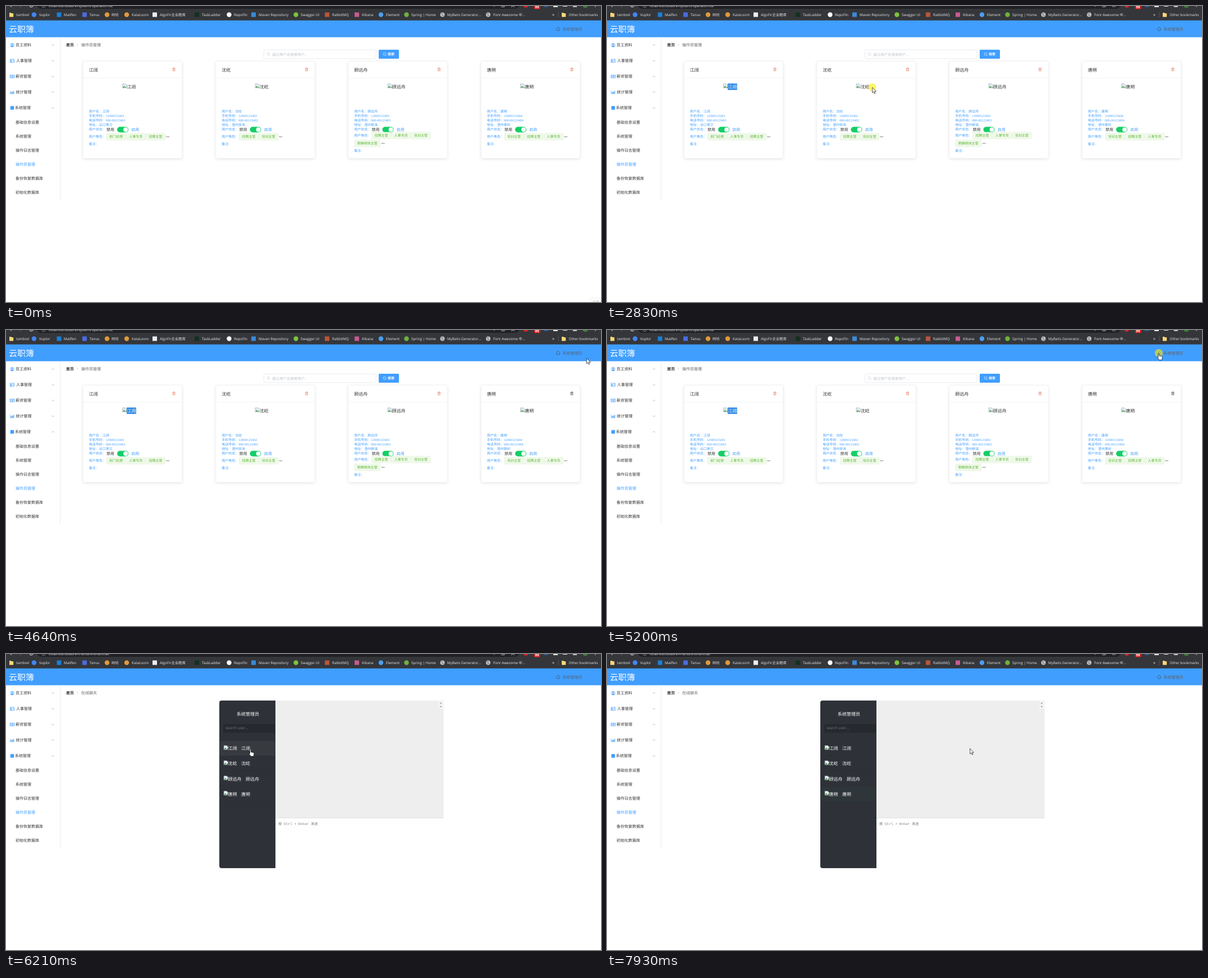
Write an HTML page that moves like this. It is 1060 px wide and 528 px high and loops after 8000 ms.

```html
<!DOCTYPE html>
<html lang="zh-CN">
<head>
<meta charset="utf-8">
<title>操作员管理</title>
<style>
html, body { margin: 0; width: 100%; height: 100%; overflow: hidden; background: #fff; }
svg { display: block; width: 1060px; height: 528px; text-rendering: geometricPrecision;
  font-family: 'Noto Sans CJK SC', 'Noto Sans CJK', sans-serif; }
.bar { font-family: 'Open Sans', 'Noto Sans CJK SC', sans-serif; }
.info { font-family: 'Liberation Serif', 'Noto Sans CJK SC', serif; }
.mono { font-family: 'Liberation Mono', 'Noto Sans CJK SC', monospace; }
.bar, .info, .medium { font-weight: 500; }
</style>
</head>
<body>
<svg id="stage" viewBox="0 0 1060 528"></svg>
<script>
const BLUE = '#409eff', INK = '#303133', GREY = '#606266', TRASH = '#e5734f';
const LOOP = 8000, CHAT_AT = 5340;

const rect = (x, y, w, h, fill, more = '') =>
  `<rect x="${x}" y="${y}" width="${w}" height="${h}" fill="${fill}" ${more}/>`;
const circle = (x, y, r, fill, more = '') =>
  `<circle cx="${x}" cy="${y}" r="${r}" fill="${fill}" ${more}/>`;
const line = (d, stroke, width = 0.6, more = '') =>
  `<path d="${d}" fill="none" stroke="${stroke}" stroke-width="${width}" ${more}/>`;
// Text is placed by its left edge and vertical centre.
const text = (x, cy, size, fill, str, more = '') =>
  `<text x="${x}" y="${(cy + size * 0.37).toFixed(2)}" font-size="${size}" fill="${fill}" ${more}>${str}</text>`;
const group = (id, body, more = '') => `<g id="${id}" ${more}>${body}</g>`;
const at = (x, y, body) => `<g transform="translate(${x} ${y})">${body}</g>`;

const people = [
  { x: 137.5, name: '江阔', phone: '12000123401', tel: '000-00123401', place: '云口青兰',
    roles: ['部门经理', '人事专员', '招聘主管'] },
  { x: 374, name: '沈屹', phone: '12000123402', tel: '000-00123402', place: '澄州安禾',
    roles: ['招聘主管', '培训主管'] },
  { x: 610, name: '顾远舟', phone: '12000123403', tel: '000-00123403', place: '澄州柳溪',
    roles: ['招聘主管', '人事专员', '培训主管'], extra: '薪酬绩效主管' },
  { x: 846.5, name: '唐朔', phone: '12000123404', tel: '000-00123404', place: '澄州景岭',
    roles: ['培训主管', '招聘主管', '人事专员'] }
];

const folder = x => `<path d="M${x} 12h3l1 1h3.2v6.5h-7.2z" fill="#f8d775"/>`;
const globe = x => circle(x, 15.5, 4, '#c4c7cb') +
  line(`M${x - 3} 13.5l3 1 1-1.5M${x - 2} 18l2-1.5 2.5 1`, '#55585c', 1);
const lens = (x, y, color) => circle(x - 0.4, y - 0.4, 2.3, 'none', `stroke="${color}" stroke-width=".6"`) +
  line(`M${x + 1.3} ${y + 1.3}l1.5 1.5`, color);

function browserBar() {
  // icon centre, shape, colour, text start, label
  const marks = [
    [50, 'o', '#4285f4', 59, 'Vuplor'], [94.5, 's', '#1a7fd4', 103, 'Mailfen'],
    [140, 's', '#4a6be0', 149, 'Tanvu'], [180, 'o', '#e09a3a', 188, '码坊'],
    [215, 'o', '#e09a3a', 224, 'KataLoom'], [265, 's', '#e9eef5', 274, 'AlgoFir企业题库'],
    [340, 's', '#12301f', 349, 'TaskLadder'], [397.5, 'o', '#ffffff', 406, 'RepoFin'],
    [441, 's', '#3b8ad8', 450, 'Maven Repository'], [516.5, 'o', '#7cc43c', 525, 'Swagger UI'],
    [572, 's', '#b9553a', 581, 'RabbitMQ'], [625, 's', '#c65a92', 634, 'Kibana'],
    [668, 'o', '#4a9ff0', 677, 'Element'], [713.5, 'o', '#6db33f', 722, 'Spring | Home'],
    [777.5, 'g', '', 786, 'MyBatis Generator...'], [859, 'g', '', 868, 'Font Awesome 中...']
  ];
  const label = (x, str) => text(x, 15.5, 6.35, '#e8eaed', str);
  const url = (id, path) => group(id, text(76, 0, 6.5, '#e8eaed', 'localhost:8080/#/' + path));
  let out = rect(0, 0, 1060, 26, '#35363a') + rect(55, -12, 860, 17, '#202124', 'rx="8"') +
    url('urlList', 'system/operator/list') + url('urlChat', 'friend/online/chat') +
    line('M7 -1l3 3', '#e8eaed', 1) + line('M25 2l3-3', '#77797d', 1) +
    circle(45, -1, 3, 'none', 'stroke="#e8eaed"') + circle(67, -0.5, 3, 'none', 'stroke="#9aa0a6" stroke-width=".8"') +
    line('M869 1l3-2M882 1.5h6v-3M900 2l3-2 3 2', '#d4d6d9', 0.8) +
    circle(926, -1, 4, '#d8232a') + rect(958, -3, 8, 4.5, '#2b6cb0') + rect(975, -3, 8, 5, '#eef0f2') +
    rect(992, -3, 8, 4, '#eef0f2') + rect(1010, -3, 7, 5, '#c4c7cb') + circle(1032, -1.5, 5, '#3f7d3a') +
    circle(1050, 1, 0.8, '#e8eaed') + rect(941, -3, 10.5, 8.5, '#e02020', 'rx="1.5"') +
    text(942.6, 2.2, 6, '#fff', '99', 'font-weight="700"') +
    folder(6) + label(18, 'tambrel');
  for (const [x, shape, color, tx, str] of marks) {
    out += shape === 'o' ? circle(x, 15.5, 4.2, color)
      : shape === 's' ? rect(x - 4, 11.5, 8, 8, color) : globe(x);
    out += label(tx, str);
  }
  return `<g class="bar">${out}${text(973, 15, 8, '#e8eaed', '»')}${line('M984 11v9', '#6a6c70', 0.6)}` +
    `${folder(990)}${label(1002.5, 'Other bookmarks')}</g>`;
}

function header() {
  return rect(0, 25.7, 1060, 30, BLUE) + text(5, 41.3, 15, '#fff', '云职簿', 'class="medium"') +
    line('M981 43.2v-2.4a2.7 2.7 0 0 1 5.4 0v2.4M980.4 43.3h6.6M983 44.4h1.4M983.7 38v-.8', '#44566d', 0.7) +
    text(991.5, 41, 7, GREY, '系统管理员');
}

function sidebar() {
  const icons = [
    circle(0, 0, 3.4, 'none', `stroke="${BLUE}" stroke-width=".7"`) + circle(0, -0.9, 1.4, BLUE) +
      `<path d="M-2.3 2.3a2.4 2 0 0 1 4.6 0L0 3.3z" fill="${BLUE}"/>`,
    rect(-3.7, -2.7, 7.4, 5.4, 'none', `stroke="${BLUE}" stroke-width=".7"`) + circle(-1.7, -0.8, 0.9, BLUE) +
      rect(-2.9, 0.3, 2.4, 1.4, BLUE) + line('M.6-1h2.3M.6.7h2.3', BLUE),
    rect(-3.7, -2.4, 7.4, 4.8, 'none', `stroke="${BLUE}" stroke-width=".9"`) + circle(0, 0, 1.3, BLUE) +
      line('M-2.7-.6v1.2M2.7-.6v1.2', BLUE),
    line('M-3.6-3v6h7.4', BLUE) + line('M-2 2.4V.3M-.4 2.4v-3.8M1.2 2.4V-.4M2.8 2.4v-4.8', BLUE, 1.1),
    rect(-3.2, -3.2, 6.4, 6.4, BLUE)
  ];
  const titles = ['员工资料', '人事管理', '薪资管理', '统计管理', '系统管理'];
  const left = [17, 18, 17, 17.5, 16];
  const items = ['基础信息设置', '系统管理', '操作日志管理', '操作员管理', '备份恢复数据库', '初始化数据库'];
  const menu = titles.map((str, i) => {
    const y = 69.7 + i * 28, flip = i === 4 ? -1 : 1;
    return at(11, y, icons[i]) + text(left[i], y, 7, INK, str) +
      line(`M81.5 ${y - flip}l2.2 ${2 * flip} 2.2 ${-2 * flip}`, '#909399', 0.6);
  }).join('');
  const sub = items.map((str, i) => text(17, 207.2 + i * 25, 7, i === 3 ? BLUE : INK, str)).join('');
  return menu + sub + rect(96.4, 55.7, 0.6, 290.3, '#dcdfe6');
}

const broken = (x, y) => at(x, y,
  '<path d="M.4.4h5l2 2v5.2h-7z" fill="#e4eefa" stroke="#8b9096" stroke-width=".6"/>' +
  '<path d="M.8 7.2L3.2 3.8 5 6l2-1v2.2z" fill="#48a04c"/>' + line('M7.8 3.4L3.4 8', '#fff', 0.9));

const crumb = str => text(134, 69, 7, GREY, str);

function tag(x, cy, str) {
  const w = str.length * 6 + 10;
  return rect(x, cy - 6, w, 12, '#f0f9eb', 'rx="1.5" stroke="#d8eecb" stroke-width=".5"') +
    text(x + 5, cy, 6, '#5fb834', str, 'class="medium"');
}

function card(p, i) {
  const x = p.x, left = x + 10.3, roleY = p.extra ? 231 : 233.2;
  const info = (cy, str) => text(left, cy, 6, BLUE, str, 'class="info"');
  let out = rect(x, 99, 176, 172.5, '#fff', 'rx="2" stroke="#ebeef5" stroke-width=".5" filter="url(#shadow)"') +
    rect(x, 128, 176, 0.5, '#e6e9f0') + text(left, 114, 8, INK, p.name) +
    at(x + 161.5, 113.2, line('M-2.6-1.8H2.6M-1-1.8v-1H1v1M-1.9-1.8v4.5h3.8v-4.5M-.6-.5v2M.6-.5v2',
      TRASH, 0.6, `id="trash${i}"`)) +
    broken(x + 69.7, 138.5) +
    (i ? '' : rect(215, 138.3, 16.8, 11.4, '#2b87e3', 'id="selection"')) +
    text(x + 77.8, 144, 8, INK, p.name, `id="alt${i}"`) +
    info(188, '用户名：' + p.name) + info(196, '手机号码：' + p.phone) +
    info(204, '电话号码：' + p.tel) + info(211.8, '地址：' + p.place) + info(219.3, '用户状态：') +
    text(x + 41.5, 220, 7, INK, '禁用', 'class="medium"') +
    rect(x + 60.5, 215.5, 20, 10, '#13ce66', 'rx="5"') + circle(x + 75.6, 220.5, 4, '#fff') +
    text(x + 85.8, 220, 7, BLUE, '启用', 'class="medium"') + info(roleY, '用户角色：');
  p.roles.forEach((r, k) => out += tag(x + 41.5 + k * 35.3, roleY, r));
  let dotX = x + 41.5 + p.roles.length * 35.3, dotY = roleY;
  if (p.extra) {
    out += tag(x + 10.8, 245, p.extra);
    [dotX, dotY] = [x + 58.5, 245];
  }
  for (let k = 0; k < 3; k++) out += circle(dotX + 1.2 + k * 2, dotY, 0.75, GREY);
  return out + info(p.extra ? 257.3 : 245.3, '备注：');
}

function listPage() {
  return crumb('操作员管理') +
    rect(459.5, 78.3, 199.5, 15.4, '#fff', 'rx="2" stroke="#dcdfe6" stroke-width=".6"') +
    lens(467.8, 86, '#c0c4cc') + text(474, 86.2, 6.5, '#c0c4cc', '通过用户名搜索用户...') +
    rect(664, 78, 36, 16, BLUE, 'rx="1.5"') + lens(674.8, 86, '#fff') +
    text(680, 86, 6, '#fff', '搜索', 'font-weight="700"') + people.map(card).join('');
}

const rowTop = i => 155 + i * 27.1;

function chatPage() {
  let out = crumb('在线聊天') +
    '<path d="M480 83h-96a4 4 0 0 0-4 4v291a4 4 0 0 0 4 4h96z" fill="#2e3238"/>' +
    text(411, 107.3, 8, '#fff', '系统管理员') + rect(387, 125, 92, 15.3, '#26292e') +
    text(391, 132, 6.5, '#75797e', 'search user...', 'class="bar"') + rect(380, 154.6, 100, 0.5, '#292c33');
  people.forEach((p, i) => {
    const cy = rowTop(i) + 13.4;
    out += rect(380, rowTop(i), 100, 26.8, '#2e3238', `id="row${i}"`) +
      rect(380, rowTop(i) + 26.6, 100, 0.5, '#292c33') + broken(387.7, cy - 5.6) +
      text(395.5, cy, 8, '#fff', p.name) + text(403 + p.name.length * 8, cy, 8, '#fff', p.name);
  });
  return out + rect(480, 83, 299.5, 209.5, '#eee') + rect(480, 292.2, 299.5, 0.6, '#d0d0d0') +
    rect(770.5, 83, 8.5, 15, '#f4f4f4') +
    '<path d="M772.6 88.6l1.9-2 1.9 2zM772.6 93l1.9 2 1.9-2z" fill="#8a8a8a"/>' +
    text(485, 302.4, 6.2, '#757575', '按 Ctrl + Enter 发送', 'class="mono"');
}

const pointer = group('arrow',
    '<path d="M.2.2v9.6l2.2-2.1 1.6 3.6 1.5-.7-1.6-3.4h3z" fill="#fff" stroke="#111" stroke-width=".7"/>') +
  group('hand', '<path d="M-1 1q1-1.4 2 0v4l1.5.2 1.6.3 1.5.5q1 .4.9 1.5l-.6 3.2-.4 1.9H.7L-2.2 8.2q-.7-1.4.5-1.3L-1 7.6z" ' +
    'fill="#fff" stroke="#111" stroke-width=".8"/>');

document.getElementById('stage').innerHTML =
  '<defs><filter id="shadow" x="-10%" y="-10%" width="120%" height="120%">' +
  '<feDropShadow dx="0" dy="1" stdDeviation="2.4" flood-opacity=".12"/></filter></defs>' +
  rect(0, 0, 1060, 528, '#fff') + browserBar() + header() + sidebar() +
  text(107, 69, 7, INK, '首页', 'font-weight="700"') + line('M126.2 67l1.8 2-1.8 2', '#b4b9c2') +
  group('list', listPage()) + group('chat', chatPage()) +
  group('tip', rect(1041, 521, 17, 9, '#fff', 'stroke="#e2e2e2" stroke-width=".6"') + text(1045, 527, 5, '#b8b8b8', '中 简')) +
  circle(0, 0, 7, '#ffef00', 'id="press" opacity=".6"') + group('pointer', pointer);

const el = id => document.getElementById(id);
const show = (id, on) => el(id).setAttribute('display', on ? 'inline' : 'none');
const paint = (id, attr, value) => el(id).setAttribute(attr, value);

// time, x, y of the pointer tip
const track = [
  [530, 738, 493], [800, 520, 350], [1080, 172, 200], [1300, 217, 138], [1600, 217, 138],
  [2130, 399, 140], [2500, 497, 146], [2830, 472.5, 145], [2900, 478, 144], [3150, 478, 144],
  [3320, 683, 143], [3500, 683, 143], [3940, 869, 153], [4200, 1005, 112], [4360, 1014, 84],
  [4600, 1044, 52], [4850, 985, 41], [5130, 1038, 60], [5200, 983, 41], [5590, 983, 41],
  [5850, 400, 250], [5950, 439, 213], [6130, 439, 213], [6210, 435.5, 170], [6590, 435.5, 170],
  [6850, 450, 290], [7000, 492, 350], [7200, 270, 310], [7370, 352, 362], [7550, 560, 382],
  [7750, 876, 250], [7860, 700, 126], [7930, 646.5, 168.5]
];

function tipAt(t) {
  const i = track.findIndex(k => k[0] > t);
  if (i < 0) return track[track.length - 1].slice(1);
  if (i === 0) return track[0].slice(1);
  const [a, b] = [track[i - 1], track[i]], f = (t - a[0]) / (b[0] - a[0]);
  return [a[1] + (b[1] - a[1]) * f, a[2] + (b[2] - a[2]) * f];
}

function draw(t) {
  const chat = t >= CHAT_AT, [x, y] = tipAt(t);
  const within = (l, top, r, b) => x >= l && x < r && y >= top && y < b;
  const row = chat && within(380, 155, 480, 263) ? Math.floor((y - 155) / 27.1) : -1;
  const onBell = within(978, 36, 1028, 47);
  const selected = t >= 1700;

  show('list', !chat);
  show('chat', chat);
  show('urlList', !chat);
  show('urlChat', chat);
  show('tip', t < 100);
  show('selection', selected);
  paint('alt0', 'fill', selected ? '#fff' : INK);
  paint('trash3', 'stroke', t >= 4200 ? INK : TRASH);
  people.forEach((p, i) => paint('row' + i, 'fill',
    i === row ? '#373a3f' : i === 3 && t > 6850 ? '#2f3639' : '#2e3238'));

  show('pointer', t >= 530);
  show('hand', onBell || row >= 0);
  show('arrow', !onBell && row < 0);
  paint('pointer', 'transform', `translate(${x} ${y})`);
  show('press', t >= 1370 && t < 3030 || t >= 5200 && t < CHAT_AT);
  paint('press', 'transform', `translate(${x} ${y})`);
}

const start = performance.now();
function tick() {
  draw((performance.now() - start) % LOOP);
  requestAnimationFrame(tick);
}
draw(0);
requestAnimationFrame(tick);
</script>
</body>
</html>
```
